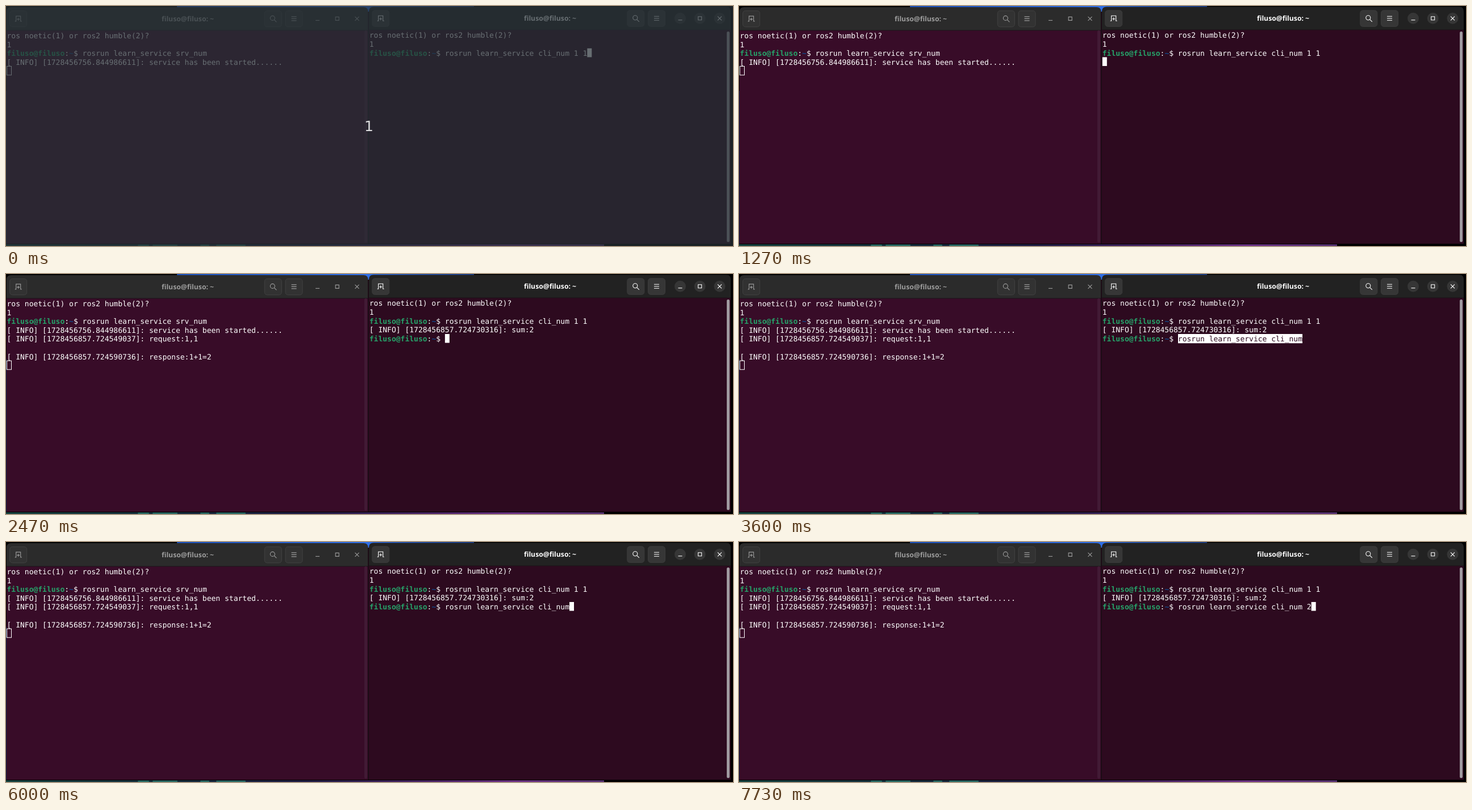
Recreate the animation shown at these times as an HTML page. Size 1280x424 px, loop 8 s.

```html
<!DOCTYPE html>
<html lang="en">
<head>
<meta charset="utf-8">
<title>Service call in two terminals</title>
<style>
  html, body { margin: 0; width: 100%; height: 100%; overflow: hidden; background: #000; }
  svg { display: block; }
  text { white-space: pre; text-rendering: geometricPrecision; }
  .mono { font: 13px "DejaVu Sans Mono", monospace; fill: #fff; }
  .title { font: bold 12.2px "Open Sans", sans-serif; text-anchor: middle; }
  .count { font: 25px "DejaVu Sans", sans-serif; text-anchor: middle; fill: #dedee0; }
  .user { font-weight: bold; fill: #26a269; }
  .path { font-weight: bold; fill: #12488b; }
  .icon { fill: none; stroke-width: 1.1; }
</style>
</head>
<body>
<svg width="1280" height="424" viewBox="0 0 1280 424">
  <defs>
    <linearGradient id="sky">
      <stop offset="0" stop-color="#1a4fb8"/><stop offset=".64" stop-color="#2f6fe6"/><stop offset="1" stop-color="#163f94"/>
    </linearGradient>
    <linearGradient id="ground">
      <stop offset="0" stop-color="#16423f"/><stop offset=".3" stop-color="#152a3c"/>
      <stop offset=".5" stop-color="#1f1c44"/><stop offset=".72" stop-color="#4d2468"/>
      <stop offset=".85" stop-color="#6c3184"/><stop offset="1" stop-color="#54306f"/>
    </linearGradient>
  </defs>
  <g id="scene"></g>
  <g id="live"></g>
</svg>
<script>
const LOOP = 8000, CELL = 7.827, ROW = 15.6;
const USER = "filuso@filuso";
const COMMAND = "rosrun learn_service cli_num";
const left = { x: 1.5, y: 44.6, bg: "#380c28" };
const right = { x: 639.8, y: 44, bg: "#2d0a1f" };

const rect = (x, y, w, h, fill, extra = "") =>
  `<rect x="${x}" y="${y}" width="${w}" height="${h}" fill="${fill}" ${extra}/>`;
const line = (term, row, content, col = 0, fill = "#fff") =>
  `<text class="mono" x="${term.x + col * CELL}" y="${term.y + 12.4 + row * ROW}" style="fill:${fill}">${content}</text>`;
const prompt = (command = "") =>
  `<tspan class="user">${USER}</tspan>:<tspan class="path">~</tspan>$ ${command}`;
const info = (stamp, message) => `[ INFO] [${stamp}]: ${message}`;

const ICONS = {
  tab: "M-6 4.5h2v-9h8v9h2M0 -1.5v5M-2.5 1h5",
  search: "M3 -1a4 4 0 1 1 -8 0a4 4 0 1 1 8 0M2 2l4 4",
  menu: "M-4.5 -3.5h9M-4.5 0h9M-4.5 3.5h9",
  min: "M-3.5 3h7",
  max: "M-3 -3h6v6h-6z",
  close: "M-3.5 -3.5l7 7M3.5 -3.5l-7 7",
};

function windowFrame(term, x, width, look) {
  const end = x + width, top = term.y - 42.6, cy = term.y - 22.2, body = Math.round(term.y - 2);
  const icon = (name, cx) =>
    `<path class="icon" d="${ICONS[name]}" stroke="${look.ink}" transform="translate(${cx} ${cy})"/>`;
  const button = (name, cx) =>
    rect(cx - 15, cy - 14, 30, 28.5, look.button, `rx="4.5" stroke="${look.edge}"`) + icon(name, cx);
  const control = (name, cx) =>
    (look.round ? `<circle cx="${cx}" cy="${cy}" r="10" fill="${look.button}"/>` : "") + icon(name, cx);
  return `<path d="M${x} ${body}V${top + 8}q0 -8 8 -8H${end - 8}q8 0 8 8V${body}z" fill="${look.bar}"/>`
    + rect(x, body, width, 420 - body, term.bg)
    + rect(x, body - .5, width, 1, "#1b1419")
    + button("tab", x + 20.7) + button("search", end - 167.2) + button("menu", end - 130.5)
    + control("min", end - 89) + control("max", end - 54.3) + control("close", end - 19.5)
    + `<text class="title" x="${x + 319}" y="${cy + 4.3}" fill="${look.ink}">${USER}: ~</text>`;
}

function drawScene() {
  const glints = [[232, 20], [258, 44], [342, 16], [370, 52]]
    .map(([x, w]) => rect(x, 421.5, w, 2.5, "#2a6b64", 'rx="1.2"')).join("");
  return rect(0, 0, 1280, 424, "#000")
    + rect(301, 0, 523, 12, "url(#sky)")
    + rect(0, 150, 1, 270, "#0e1b42")
    + rect(0, 421, 1053, 3, "url(#ground)") + glints
    + windowFrame(left, 1, 636.5, { bar: "#2b2b2b", button: "#323232", edge: "#414141", ink: "#9c9c9c" })
    + windowFrame(right, 639, 637, { bar: "#222", button: "#363636", edge: "#3c3c3c", ink: "#fff", round: true })
    + rect(637, 10, 2, 410, "#1c0c16")
    + rect(631, 43, 5, 375, "#421a35", 'rx="2.5"')
    + rect(1269, 45, 5, 372, "#a09aa0", 'rx="2.5"')
    + [left, right].map(t => line(t, 0, "ros noetic(1) or ros2 humble(2)?") + line(t, 1, "1")).join("")
    + line(left, 2, prompt("rosrun learn_service srv_num"))
    + line(left, 3, info("1728456756.844986611", "service has been started......"))
    + line(right, 2, prompt(COMMAND + " 1 1"));
}

// Right cursor: start time, then row and column; no row means hidden.
const CURSOR = [
  [0, 2, 49], [70], [600, 2, 49], [1200], [1270, 3, 0], [1470, 4, 0], [1600, 4, 17], [1870],
  [2470, 4, 17], [3600], [4200, 4, 45], [5330], [6000, 4, 45], [6330, 4, 46], [6930],
  [7530, 4, 46], [7730, 4, 47],
];

function drawLive(t) {
  const answered = t >= 1470, selected = t >= 3600 && t < 4730;
  const [, row, col] = CURSOR.findLast(step => t >= step[0]);
  let out = rect(left.x, left.y + (answered ? 7 : 4) * ROW - .5, 8, 15.5, "none", 'stroke="#fff"');
  if (answered) {
    out += line(left, 4, info("1728456857.724549037", "request:1,1"))
      + line(left, 6, info("1728456857.724590736", "response:1+1=2"))
      + line(right, 3, info("1728456857.724730316", "sum:2"));
  }
  if (t >= 1600) out += line(right, 4, prompt());
  if (selected) out += rect(773, 106, 219, 16.3, "#fff");
  if (t >= 3600) out += line(right, 4, COMMAND + (t >= 7730 ? " 2" : ""), 17, selected ? right.bg : "#fff");
  if (row) out += rect(right.x + col * CELL, right.y + row * ROW - .4, 8, ROW, "#fff");
  if (t < 70) {
    out += rect(0, 0, 1280, 424, "rgba(39,49,55,.7)")
      + '<text class="count" x="639" y="221">1</text>';
  }
  return out;
}

const scene = document.getElementById("scene"), live = document.getElementById("live");
scene.innerHTML = drawScene();
let shown = "";
function tick() {
  const next = drawLive(performance.now() % LOOP);
  if (next !== shown) live.innerHTML = shown = next;
  requestAnimationFrame(tick);
}
tick();
</script>
</body>
</html>
```
